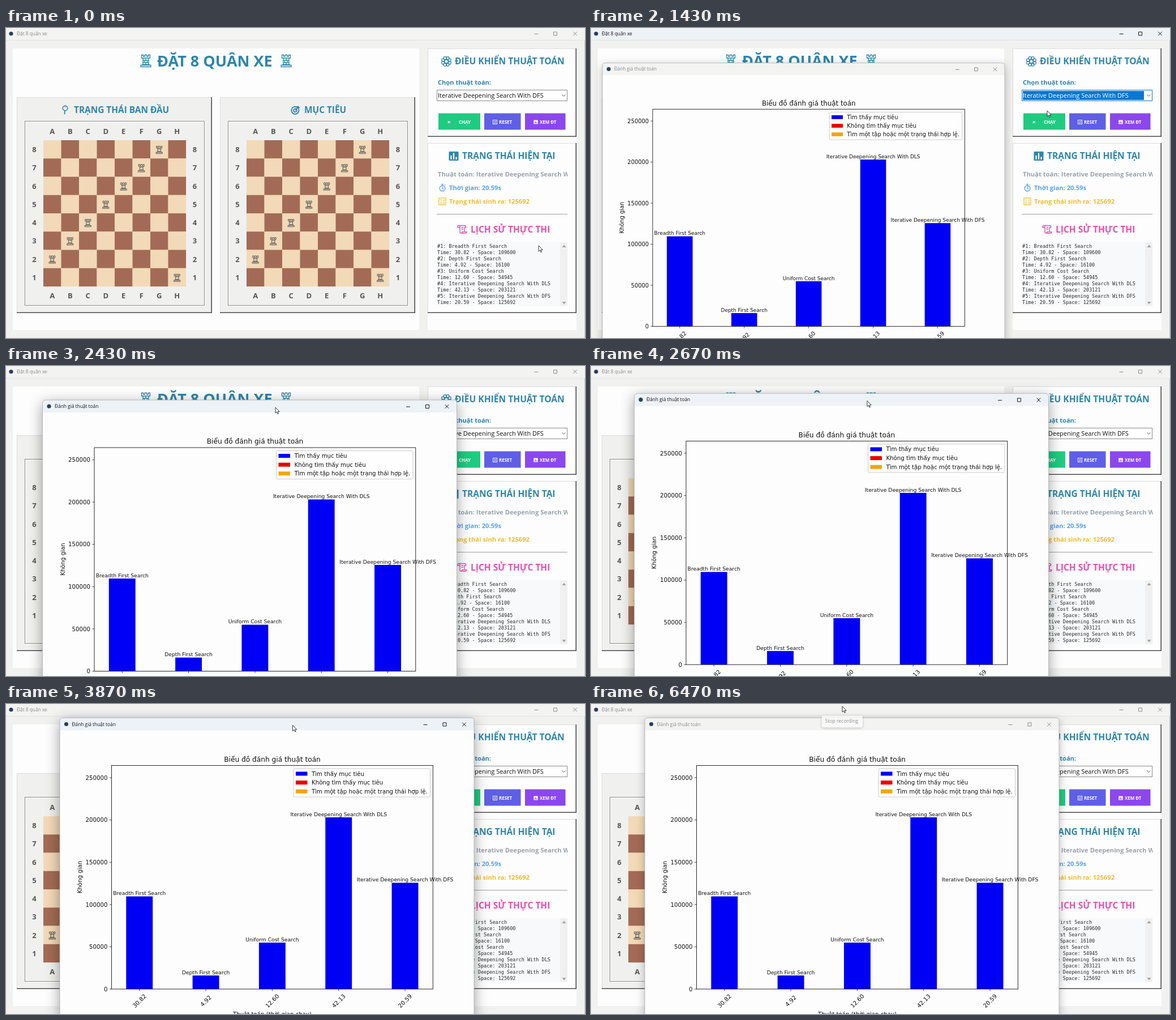
Recreate the animation shown at these times as an HTML page. Size 1023 by 547 pixels, loop 6510 ms.

```html
<!DOCTYPE html>
<html lang="vi">
<head>
<meta charset="utf-8">
<title>Đặt 8 quân xe</title>
<style>
html, body { margin: 0; width: 100%; height: 100%; overflow: hidden; background: #f1f1ef; }
svg { display: block; width: 100vw; height: 100vh; }
text { font-family: "Open Sans", "Noto Sans", sans-serif; white-space: pre; }
.b { font-weight: 700; }
.plot text { font-family: "DejaVu Sans", sans-serif; font-size: 10.2px; fill: #111; }
.log text { font: 8.52px "DejaVu Sans Mono", "Noto Sans Mono", monospace; fill: #2b2b2b; }
.bar { fill: #f3f3f2; }
.cap { fill: #8b8b8b; font-size: 8.35px; }
.ctl { stroke: #8b8b8b; fill: none; }
.shade { filter: drop-shadow(0 4px 8px rgba(0,0,0,.28)); }
.on .bar { fill: #edf2f7; }
.on .cap { fill: #161616; }
.on .ctl { stroke: #161616; }
.on .shade { filter: drop-shadow(0 6px 12px rgba(0,0,0,.38)); }
</style>
</head>
<body>
<svg id="stage" viewBox="0 0 1023 547" preserveAspectRatio="none"></svg>
<script>
const LOOP = 6510;
const TEAL = '#2e86ab', PINK = '#e84fae', GREY = '#555';

// --- markup helpers ---
const rect = (x, y, w, h, fill, more = '') =>
  `<rect x="${x}" y="${y}" width="${w}" height="${h}" fill="${fill}" ${more}/>`;
const path = (d, stroke, width = 1, more = '') =>
  `<path d="${d}" fill="none" stroke="${stroke}" stroke-width="${width}" ${more}/>`;
const text = (x, y, str, size, fill, more = '') =>
  `<text x="${x}" y="${y}" font-size="${size}" fill="${fill}" ${more}>${str}</text>`;
const bold = (x, y, str, size, fill, more = '') => text(x, y, str, size, fill, `class="b" ${more}`);
const at = (x, y, body, more = '') => `<g transform="translate(${x} ${y}) ${more}">${body}</g>`;
const range = n => [...Array(n).keys()];
const MID = 'text-anchor="middle"';

// --- icons, each centred on 0,0 ---
const rook = (color, w) => path(
  'M-5-6.5V-3.2H5V-6.5H2.8V-4.8H1.2V-6.5H-1.2V-4.8H-2.8V-6.5ZM-3.4-3.2L-2.8-1.4V2.6L-4 4.2H4L2.8 2.6V-1.4L3.4-3.2M-2.8-1.4H2.8M-2.8 2.6H2.8M-5.6 6.6V4.4H5.6V6.6Z', color, w);
const bigRook = path(
  'M-7.5-10.5V-5H7.5V-10.5H4.5V-8H1.8V-10.5H-1.8V-8H-4.5V-10.5ZM-5-5V6.5M5-5V6.5M-5-1H5M-5 3H5M0-5V-1M-2.5-1V3M2.5-1V3M0 3V6.5M-6.5 6.5H6.5M-9 10.5V7.5H9V10.5Z', TEAL, 1.3);
const pin = `<circle cy="-3" r="4.3" fill="none" stroke="${TEAL}" stroke-width="1.6"/>` +
  path('M-.6 1.4L-1 7.8', TEAL, 1.8) + path('M-1.5-4.8Q0-6 1.6-4.4', TEAL, .8);
const target = `<circle cx="-.6" cy=".8" r="6.6" fill="none" stroke="${TEAL}" stroke-width="1.9"/>
  <circle cx="-.6" cy=".8" r="2.9" fill="none" stroke="${TEAL}" stroke-width="1.7"/>` +
  path('M-.6.8L6-5.8M4-7V-4H7.4', TEAL, 1.7);
const flower = range(8).map(i => {
  const a = i * Math.PI / 4 + .39;
  return `<circle cx="${6.3 * Math.cos(a)}" cy="${6.3 * Math.sin(a)}" r="2.5" fill="none" stroke="${TEAL}" stroke-width="1.3"/>`;
}).join('') + `<circle r="3.2" fill="none" stroke="${TEAL}" stroke-width="1.4"/>`;
const chart = rect(-8.5, -8, 17, 16, TEAL, 'rx="1"') +
  path('M-4.5 6V-1M0 6V-5.5M4.5 6V1.5', '#fff', 2.2);
const watch = '<circle cy="1" r="4.8" fill="none" stroke="#5aa0ee" stroke-width="1.4"/>' +
  path('M0-6.5V-4M-2-6.4H2M3.8-4.4L5-5.6M0-2V1.2L2 2.4', '#5aa0ee', 1.3);
const digits = rect(-6, -6, 12, 12, 'none', 'stroke="#f0bc28" stroke-width="1.2"') +
  bold(-2.6, -.4, '1', 5.5, '#f0bc28', MID) + bold(2.6, -.4, '2', 5.5, '#f0bc28', MID) +
  bold(-2.6, 4.8, '3', 5.5, '#f0bc28', MID) + bold(2.6, 4.8, '4', 5.5, '#f0bc28', MID);
const scroll = path('M-5.5-6.5H4Q6.5-6.5 6.5-4V-3H4V4.5M-5.5-6.5Q-8-6.5-8-4V-3H-4M-4-6V5Q-4 7-1.5 7H6Q8 7 8 4.6H0Q0 7-1.8 7M-1.5-3H2M-1.5 0H2', PINK, 1.4);
const play = '<path d="M-2.2-2.4L2.6 0L-2.2 2.4Z" fill="#fff"/>';
const reset = rect(-3.6, -3.5, 7.2, 7, 'none', 'stroke="#fff" stroke-width=".9"') +
  path('M-2-.8H1.8L.8-1.9M2 1.2H-1.8L-.8 2.2', '#fff', .8);
const disk = rect(-3.7, -3.5, 7.4, 7, '#fff') + path('M-1.6 2.4V0M0 2.4V-1.8M1.6 2.4V.6', '#8b47ec', 1);

// --- window parts ---
const raised = (x, y, w, h, fill) => rect(x, y, w, h, fill) +
  path(`M${x + .5} ${y + h}V${y + .5}H${x + w}`, '#dcdce2') +
  path(`M${x + w - .8} ${y}V${y + h - .8}H${x}`, '#4c4c4c', 1.6);
const controls = (min, max, close, y) => `<g class="ctl">
  <path d="M${min - 3.5} ${y + .5}h7M${max - 3} ${y - 3}h6v6h-6zM${close - 3.3} ${y - 3.3}l6.6 6.6m0-6.6l-6.6 6.6"/></g>`;
const dot = (x, y) => `<circle cx="${x}" cy="${y}" r="3.6" fill="#27405f"/>`;

function board(x0) {
  let s = '';
  for (const r of range(8)) {
    for (const c of range(8)) {
      const x = x0 + c * 31.5, y = 198 + r * 32.25;
      s += rect(x, y, 31.6, 32.35, (r + c) % 2 ? '#a36b55' : '#f2d9b7');
      if (c === (r === 7 ? 7 : 6 - r)) s += at(x + 15.7, y + 17, rook('#585858', 1));
    }
    const mid = x0 + 15.75 + r * 31.5, row = 219 + r * 32.25;
    for (const y of [187, 477]) s += bold(mid, y, 'ABCDEFGH'[r], 13, GREY, MID);
    for (const x of [-16, 267.5]) s += bold(x0 + x, row, 8 - r, 13, GREY, MID);
  }
  return s;
}

const boardPanel = (x, icon, iconX, title, titleX) => raised(x, 122, 345, 381, '#f0f0ef') +
  rect(x + 15.5, 165.5, 317, 325, 'none', 'stroke="#fff"') +
  rect(x + 14.5, 164.5, 317, 325, 'none', 'stroke="#8a8a8a"') +
  at(iconX, 144.5, icon) + bold(titleX, 150, title, 15.4, TEAL) + board(x + 47);

const button = (x, w, fill, icon, iconX, label, labelX) =>
  rect(x, 150.5, w, 29, fill) + at(iconX, 166, icon) + bold(labelX, 168.5, label, 7.9, '#fff');

const runs = [
  ['Breadth First Search', '30.82', 109600],
  ['Depth First Search', '4.92', 16100],
  ['Uniform Cost Search', '12.60', 54945],
  ['Iterative Deepening Search With DLS', '42.13', 203121],
  ['Iterative Deepening Search With DFS', '20.59', 125692]
];

const log = runs.flatMap(([name, time, space], i) => [`#${i + 1}: ${name}`, `Time: ${time} - Space: ${space}`])
  .map((line, i) => `<text x="762" y="${388 + i * 10.97}">${line}</text>`).join('');

const mainWindow = `<g id="main">
  ${rect(0, 0, 1023, 547, '#f1f1ef')}
  <rect class="bar" width="1023" height="21"/>
  ${path('M0 21.5H1023', '#e2e2e2')}${path('M1022.5 22V547', '#c9c9c9')}
  ${dot(9, 10)}<text class="cap" x="19" y="13">Đặt 8 quân xe</text>
  ${controls(937, 970.5, 1005.5, 10)}
  ${rect(12, 36, 718, 497, '#fdfdfd')}${rect(745, 36, 263, 497, '#fdfdfd')}
  ${at(247, 58, bigRook)}${at(495, 58, bigRook)}
  ${bold(267, 67.7, 'ĐẶT 8 QUÂN XE', 27, TEAL)}
  ${boardPanel(19, pin, 104.5, 'TRẠNG THÁI BAN ĐẦU', 120)}
  ${boardPanel(378, target, 511.5, 'MỤC TIÊU', 527)}
  ${raised(745, 36, 263, 156, '#fdfdfd')}
  ${at(778, 59, flower)}${bold(793, 64.4, 'ĐIỀU KHIỂN THUẬT TOÁN', 15.6, TEAL)}
  ${bold(763, 100, 'Chọn thuật toán:', 11.1, TEAL)}
  ${rect(761.5, 109.5, 230, 19, '#fff', 'id="combo" stroke="#8a8a8a"')}
  ${rect(763, 111, 214, 16, '#0a78d0', 'id="pick"')}
  ${text(763, 123, 'Iterative Deepening Search With DFS', 11, '#111', 'id="choice"')}
  ${path('M982.5 117.5l3 3l3-3', '#555')}
  ${button(764, 74, '#1fcb80', play, 783, 'CHẠY', 800)}
  ${button(845, 64.5, '#5f5fe6', reset, 864, 'RESET', 871)}
  ${button(917, 71.5, '#8b47ec', disk, 936, 'XEM ĐT', 943)}
  ${raised(745, 203, 263, 300, '#fdfdfd')}
  ${at(791, 226, chart)}${bold(806, 231, 'TRẠNG THÁI HIỆN TẠI', 15.5, TEAL)}
  <clipPath id="cut"><rect x="760" y="245" width="232.5" height="30"/></clipPath>
  ${bold(763, 262, 'Thuật toán: Iterative Deepening Search With DFS', 11.2, '#98a2ae', 'clip-path="url(#cut)"')}
  ${at(771, 282, watch)}${bold(783, 286, 'Thời gian: 20.59s', 11.2, '#5aa0ee')}
  ${at(771, 306, digits)}${bold(783, 310, 'Trạng thái sinh ra: 125692', 11.2, '#f0bc28')}
  ${path('M761 328.5H992', '#a0a0a0')}
  ${at(806, 355, scroll)}${bold(821, 360.5, 'LỊCH SỬ THỰC THI', 15.5, PINK)}
  ${rect(761, 378, 218, 112.5, '#f8f9fa')}${rect(979, 378, 13, 112.5, '#f0f0f0')}
  <path d="M982.5 387l3.5-4.5l3.5 4.5zM982.5 483l3.5 4.5l3.5-4.5z" fill="#a3a3a3"/>
  <g class="log">${log}</g>
</g>`;

// --- chart window, drawn from its own top left corner ---
const L = 91.5, R = 659.3, T = 84, B = 478.5;
const unit = (R - L) / 4.84;
const yOf = v => B - v * 373 / 250000;
const bars = runs.map(([name, time, space], i) => {
  const x = L + (.42 + i) * unit, y = yOf(space);
  return rect(x - .2 * unit, y, .4 * unit, B - y, '#0000f4') +
    path(`M${x} ${B}v3.5`, '#111', .8) +
    `<text x="${x}" y="${y - 2.3}" style="font-size:9.2px" ${MID}>${name}</text>` +
    at(x, 499.5, `<text y="3.6" ${MID}>${time}</text>`, 'rotate(-45)');
}).join('');
const ticks = range(6).map(i => {
  const y = yOf(i * 50000);
  return path(`M${L} ${y}h-3.5`, '#111', .8) +
    `<text x="${L - 7}" y="${y + 3.7}" text-anchor="end">${i * 50000}</text>`;
}).join('');
const legend = rect(413, 89.5, 241.5, 50, '#fff', 'rx="2" stroke="#ccc" fill-opacity=".8"') + [
  ['#0000f4', 'Tìm thấy mục tiêu'],
  ['#ec0000', 'Không tìm thấy mục tiêu'],
  ['#f4a50a', 'Tìm một tập hoặc một trạng thái hợp lệ.']
].map(([c, s], i) => rect(417, 95 + i * 15.6, 20.5, 7, c) +
  `<text x="445" y="${102 + i * 15.6}">${s}</text>`).join('');

const chartWindow = `<g id="win">
  ${rect(0, 0, 732, 535, '#fff', 'rx="5" class="shade"')}
  ${rect(0, 0, 732, 535, '#fdfdfd', 'rx="5"')}
  <path class="bar" d="M0 22V5Q0 0 5 0H727Q732 0 732 5V22Z"/>
  ${rect(0, 0, 732, 535, 'none', 'rx="5" stroke="#a9abb0" stroke-width=".8"')}
  ${dot(11.5, 11)}<text class="cap" x="21.5" y="14">Đánh giá thuật toán</text>
  ${controls(646, 680, 714.5, 11.5)}
  <g class="plot">
    ${bars}${ticks}
    ${rect(L, T, R - L, B - T, 'none', 'stroke="#111" stroke-width=".9"')}
    ${legend}
    <text x="375.5" y="77.5" style="font-size:12.2px" ${MID}>Biểu đồ đánh giá thuật toán</text>
    <text x="375.5" y="526" ${MID}>Thuật toán (thời gian chạy)</text>
    ${at(39, 281, `<text ${MID}>Không gian</text>`, 'rotate(-90)')}
  </g>
</g>`;

const tip = `<g id="tip">
  ${rect(407.5, 20.5, 72.5, 21, '#fafafa', 'rx="3" style="filter:drop-shadow(0 1px 2px rgba(0,0,0,.25))"')}
  ${text(413.5, 33, 'Stop recording', 8.6, '#7d7d7d')}
</g>`;

const cursors = `<g id="arrow"><path d="M0 0V10.2L2.4 8L4 11.6L5.6 10.9L4 7.4H7.2Z" fill="#fff" stroke="#222" stroke-width=".9"/></g>
<g id="hand"><path d="M-1.2 6V.8Q0-.8 1.2.8V4.4Q2.4 3.8 3 4.8Q4.4 4.4 4.8 5.4Q6.4 5 6.4 6.8V9Q6.2 11 5 12.4H-.4L-3.4 8.2Q-4 6.8-3 6.3Q-2.2 6-1.2 7.4Z" fill="#fff" stroke="#222" stroke-width=".9"/></g>`;

const stage = document.getElementById('stage');
stage.innerHTML = mainWindow + chartWindow + tip + cursors;
const $ = id => document.getElementById(id);
const [main, win, tipBox, arrow, hand] = ['main', 'win', 'tip', 'arrow', 'hand'].map($);

// --- timeline: [ms, x, y] ---
const pointer = [
  [0, 941, 384], [100, 941, 384], [520, 957, 163], [950, 957, 163],
  [1430, 806, 146], [1830, 421, 67], [1950, 421, 67], [2430, 476, 73],
  [3000, 507, 43], [3280, 506.5, 37.5], [4500, 506.5, 37.5],
  [4970, 470, 64], [5330, 444, 4], [LOOP, 444, 4]
];
const OPEN = 1370, GRAB = 1950, DROP = 3280, STOP = 6300;

const clamp = v => Math.min(1, Math.max(0, v));
const smooth = k => k * k * (3 - 2 * k);
function place(t) {
  const i = Math.max(1, pointer.findIndex(p => p[0] >= t));
  const [a, x0, y0] = pointer[i - 1], [b, x1, y1] = pointer[i];
  const k = smooth(clamp((t - a) / (b - a)));
  return [x0 + (x1 - x0) * k, y0 + (y1 - y0) * k];
}
const show = (el, on) => el.setAttribute('visibility', on ? 'visible' : 'hidden');
const move = (el, x, y, s = 1) => el.setAttribute('transform', `translate(${x} ${y}) scale(${s})`);

function draw(t) {
  const [x, y] = place(t);
  const overButton = t < OPEN && x > 917 && x < 988 && y > 151 && y < 179;
  show(hand, overButton);
  show(arrow, !overButton);
  move(hand, x, y);
  move(arrow, x, y);

  const focused = t >= 760 && t < GRAB - 30;
  main.classList.toggle('on', focused);
  show($('pick'), focused);
  $('choice').setAttribute('fill', focused ? '#fff' : '#111');
  $('combo').setAttribute('stroke', focused ? '#0a78d0' : '#8a8a8a');

  show(win, t >= OPEN);
  win.classList.toggle('on', t >= GRAB - 30 && t < STOP);
  const [gx, gy] = place(Math.min(DROP, Math.max(GRAB, t)));
  const s = 1 - .1 * (1 - clamp((t - OPEN) / 180)) ** 3;
  move(win, gx - 411.5 + 366 * (1 - s), gy - 13 + 267 * (1 - s), s);

  tipBox.setAttribute('opacity', .85 * clamp((t - 6200) / 200));
}

const start = performance.now();
function tick() {
  draw((performance.now() - start) % LOOP);
  requestAnimationFrame(tick);
}
draw(0);
tick();
</script>
</body>
</html>
```
